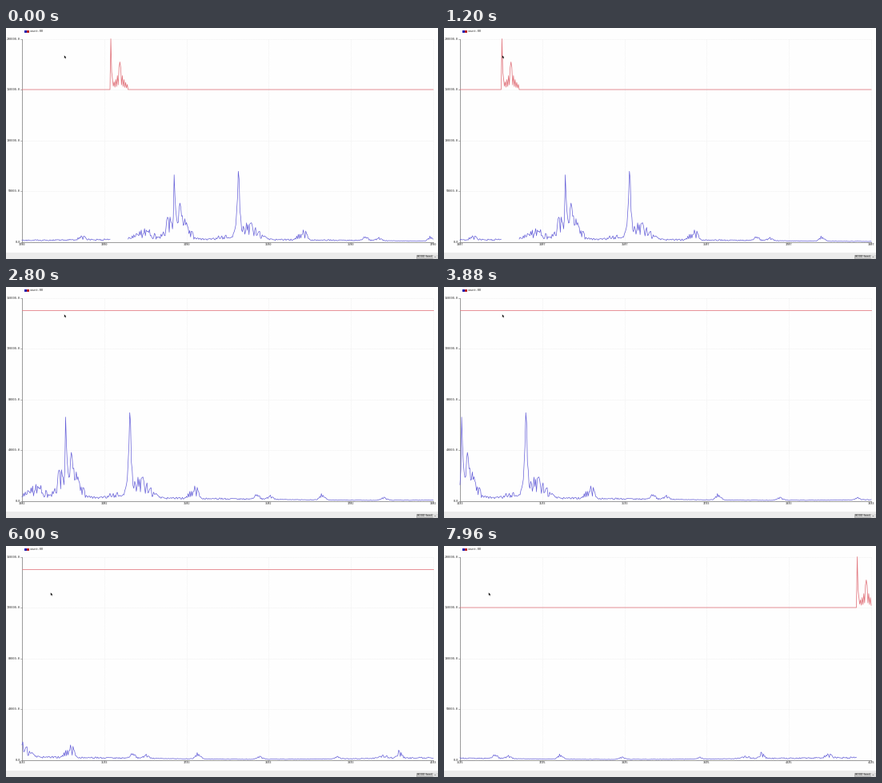
Recreate the animation shown at these times as a matplotlib script. Size 540 px wide and 289 px high, loop 8000 ms.

```python
import numpy as np
import matplotlib.pyplot as plt
from matplotlib.animation import FuncAnimation
from matplotlib.patches import Polygon, Rectangle

W, H, DPI = 540, 289, 64
FRAMES, INTERVAL = 200, 40
LEFT, RIGHT, TOP, BASE = 20, 534, 13.5, 267.5
WINDOW, PERIOD, FIRST = 500, 750, 3250
STEP = 1.885              # samples scrolled per frame
THRESHOLD = 150000
UNIT = 200000 / (BASE - TOP)
BURST_START, BURST_END = 108, 129
BLUE, RED, GREY, PALE = "#645ed8", "#e27880", "#858585", "#f1f1f1"

# noisy hills: centre, height, width
HILLS = [(73, 5, 5), (150, 13, 14), (178, 32, 6), (200, 17, 8), (245, 6, 8),
         (277, 24, 13), (341, 16, 6), (418, 6, 4), (434, 4, 5), (497, 7, 4),
         (572, 3, 5), (666, 2.5, 5), (722, 3, 8), (742, 8, 4)]
# sharp spikes: centre, height, rise, fall
SPIKES = [(185, 80, 0.6, 2.5), (191.5, 46, 1, 4), (263.5, 108, 2, 1.3)]


def pt(px):
    return px * 72 / DPI


def make_blue():
    rng = np.random.default_rng(7)
    i = np.arange(PERIOD)
    env = 2.6 + 1.8 * np.cos(2 * np.pi * (i - 200) / PERIOD)
    for c, h, w in HILLS:
        env += h * np.exp(-((i - c) / w) ** 2)
    low = np.where(env > 8, 0.25, 0.45)
    blue = env * rng.uniform(low, 1)
    for c, h, rise, fall in SPIKES:
        blue += h * np.exp(-np.abs(i - c) / np.where(i < c, rise, fall))
    blue[BURST_START:BURST_END] = np.nan
    return blue * UNIT


def make_red():
    """Flat threshold with one burst: a sharp hit, then a zigzag echo."""
    n = np.arange(BURST_END - BURST_START)
    k = np.abs(n - 11)
    zigzag = 0.6 - 0.35 * np.cos(np.pi * k)
    burst = (62 * np.exp(-1.1 * n) + 30 * np.exp(-k / 6) * zigzag
             + 27 * np.exp(-2.0 * k))
    red = np.zeros(PERIOD)
    red[BURST_START:BURST_END] = burst
    return THRESHOLD + np.minimum(red * UNIT, 50000)


blue, red = make_blue(), make_red()
xs = np.linspace(LEFT, RIGHT, WINDOW + 1)
ticks_x = np.linspace(LEFT, RIGHT, 6)
ticks_y = np.linspace(BASE, TOP, 5)

fig = plt.figure(figsize=(W / DPI, H / DPI), dpi=DPI, facecolor="#fefefe")
ax = fig.add_axes([0, 0, 1, 1])
ax.set_xlim(0, W)
ax.set_ylim(H, 0)
ax.axis("off")


def line(x, y, color, width=0.7, **kw):
    return ax.plot(x, y, color=color, lw=pt(width), **kw)[0]


def label(x, y, text="", ha="center", size=3.5, font="DejaVu Sans Mono"):
    return ax.text(x, y, text, ha=ha, va="center", color="#222222",
                   fontsize=pt(size), family=font, zorder=4)


def box(x, y, w, h, face, edge="none"):
    ax.add_patch(Rectangle((x, y), w, h, fc=face, ec=edge, lw=pt(0.6),
                           zorder=3))


for x in ticks_x:
    line([x, x], [TOP, BASE], PALE, ls=(0, (2, 1)))
    line([x, x], [BASE, BASE + 2], GREY, 0.6)
for y in ticks_y:
    line([LEFT, RIGHT], [y, y], PALE, ls=(0, (2, 1)))
    line([LEFT - 2, LEFT], [y, y], GREY, 0.6)
line([LEFT - 0.5, LEFT - 0.5], [TOP, BASE], GREY, 0.8)
line([LEFT, RIGHT], [BASE, BASE], GREY, 0.8)

# legend
box(22.8, 2.6, 2.8, 3, "#2020b0")
box(26.2, 2.6, 2.8, 3, "#b82028")
label(29.7, 4, "count.00", "left")

# status bar with selector
box(0, 281, W, 8, "#ececec")
box(512.5, 283.5, 20.5, 4.5, "#dadada", "#8c8c8c")
box(533, 283.5, 5.5, 4.5, "#ececec", "#c4c4c4")
label(513.6, 285.8, "8000 feed", "left", 3.6, "DejaVu Sans")
line([534.8, 537], [285.8, 285.8], GREY, 0.8, zorder=4)

labels_x = [label(x, 270.8) for x in ticks_x]
labels_y = [label(18, y + 0.3, ha="right") for y in ticks_y]
blue_line = line([], [], BLUE)
red_line = line([], [], RED, 0.8)

ARROW = 0.8 * np.array([(0, 0), (0, 4.3), (1, 3.5), (1.8, 5.2), (2.6, 4.8),
                        (1.9, 3.2), (3.1, 3.1)])
cursor = Polygon(ARROW, fc="#111111", ec="none", zorder=5)
ax.add_patch(cursor)


def cursor_pos(ms):
    k = np.clip((ms - 5360) / 360, 0, 1)
    k = k * k * (3 - 2 * k)
    return np.array([72.8 - 17 * k, 34.3 + 24 * k])


def update(n):
    shift = int(STEP * n + 0.5)
    idx = (shift + np.arange(WINDOW + 1)) % PERIOD
    top = 200000 if red[idx].max() > 160000 else 160000
    scale = (BASE - TOP) / top

    blue_line.set_data(xs, BASE - blue[idx] * scale)
    red_line.set_data(xs, BASE - red[idx] * scale)
    for k, text in enumerate(labels_x):
        text.set_text(str(FIRST + shift + 100 * k))
    for k, text in enumerate(labels_y):
        text.set_text(f"{top * k / 4:.1f}")
    cursor.set_xy(ARROW + cursor_pos(n * INTERVAL))
    return []


anim = FuncAnimation(fig, update, frames=FRAMES, interval=INTERVAL,
                     init_func=lambda: update(0), repeat=True,
                     repeat_delay=0, blit=False)
plt.show()
```
